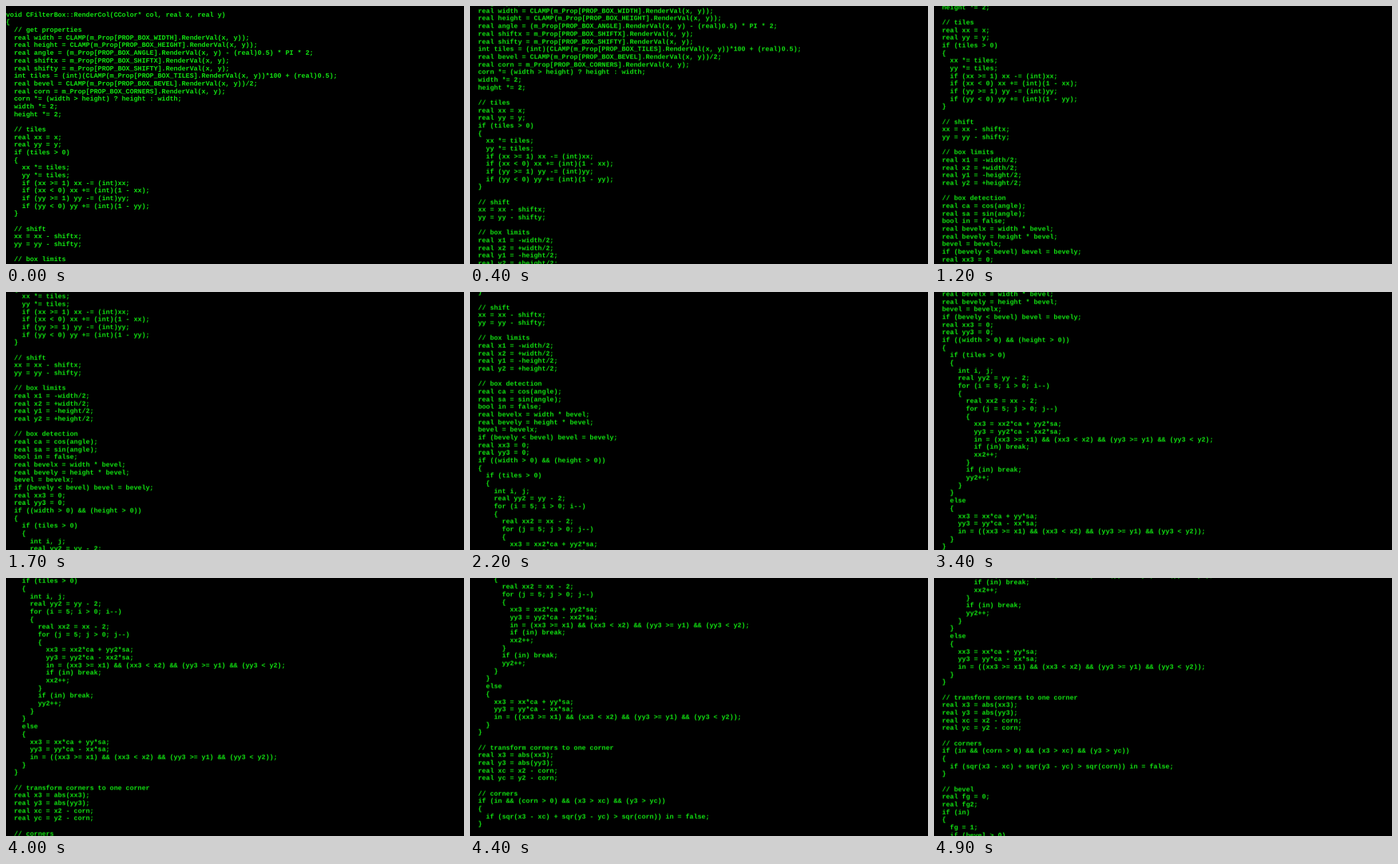
Write an HTML page that moves like this. It is 640 px wide and 360 px high and loops after 5000 ms.

```html
<!DOCTYPE html>
<html lang="en">
<head>
<meta charset="utf-8">
<title>Scrolling code</title>
<style>
  html, body {
    margin: 0;
    width: 100%;
    height: 100%;
    overflow: hidden;
    background: #000;
  }
  .stage {
    position: relative;
    width: 640px;
    height: 360px;
    overflow: hidden;
  }
  pre {
    position: absolute;
    left: 0;
    top: 7.8px;
    margin: 0;
    color: #12e612;
    font: bold 9.3px/10.6667px "Courier New", "Liberation Mono", monospace;
    text-rendering: geometricPrecision;
    animation: scroll 5s infinite;
  }
  /* short ease-in, then 14px every 100ms */
  @keyframes scroll {
    0%   { transform: translateY(0); animation-timing-function: step-end; }
    2%   { transform: translateY(-2.63px); animation-timing-function: step-end; }
    4%   { transform: translateY(-10.5px); animation-timing-function: step-end; }
    6%   { transform: translateY(-23.33px); animation-timing-function: steps(47, end); }
    100% { transform: translateY(-681.33px); }
  }
</style>
</head>
<body>
<div class="stage">
<pre>
void CFilterBox::RenderCol(CColor* col, real x, real y)
{
  // get properties
  real width = CLAMP(m_Prop[PROP_BOX_WIDTH].RenderVal(x, y));
  real height = CLAMP(m_Prop[PROP_BOX_HEIGHT].RenderVal(x, y));
  real angle = (m_Prop[PROP_BOX_ANGLE].RenderVal(x, y) - (real)0.5) * PI * 2;
  real shiftx = m_Prop[PROP_BOX_SHIFTX].RenderVal(x, y);
  real shifty = m_Prop[PROP_BOX_SHIFTY].RenderVal(x, y);
  int tiles = (int)(CLAMP(m_Prop[PROP_BOX_TILES].RenderVal(x, y))*100 + (real)0.5);
  real bevel = CLAMP(m_Prop[PROP_BOX_BEVEL].RenderVal(x, y))/2;
  real corn = m_Prop[PROP_BOX_CORNERS].RenderVal(x, y);
  corn *= (width &gt; height) ? height : width;
  width *= 2;
  height *= 2;

  // tiles
  real xx = x;
  real yy = y;
  if (tiles &gt; 0)
  {
    xx *= tiles;
    yy *= tiles;
    if (xx &gt;= 1) xx -= (int)xx;
    if (xx &lt; 0) xx += (int)(1 - xx);
    if (yy &gt;= 1) yy -= (int)yy;
    if (yy &lt; 0) yy += (int)(1 - yy);
  }

  // shift
  xx = xx - shiftx;
  yy = yy - shifty;

  // box limits
  real x1 = -width/2;
  real x2 = +width/2;
  real y1 = -height/2;
  real y2 = +height/2;

  // box detection
  real ca = cos(angle);
  real sa = sin(angle);
  bool in = false;
  real bevelx = width * bevel;
  real bevely = height * bevel;
  bevel = bevelx;
  if (bevely &lt; bevel) bevel = bevely;
  real xx3 = 0;
  real yy3 = 0;
  if ((width &gt; 0) &amp;&amp; (height &gt; 0))
  {
    if (tiles &gt; 0)
    {
      int i, j;
      real yy2 = yy - 2;
      for (i = 5; i &gt; 0; i--)
      {
        real xx2 = xx - 2;
        for (j = 5; j &gt; 0; j--)
        {
          xx3 = xx2*ca + yy2*sa;
          yy3 = yy2*ca - xx2*sa;
          in = (xx3 &gt;= x1) &amp;&amp; (xx3 &lt; x2) &amp;&amp; (yy3 &gt;= y1) &amp;&amp; (yy3 &lt; y2);
          if (in) break;
          xx2++;
        }
        if (in) break;
        yy2++;
      }
    }
    else
    {
      xx3 = xx*ca + yy*sa;
      yy3 = yy*ca - xx*sa;
      in = ((xx3 &gt;= x1) &amp;&amp; (xx3 &lt; x2) &amp;&amp; (yy3 &gt;= y1) &amp;&amp; (yy3 &lt; y2));
    }
  }

  // transform corners to one corner
  real x3 = abs(xx3);
  real y3 = abs(yy3);
  real xc = x2 - corn;
  real yc = y2 - corn;

  // corners
  if (in &amp;&amp; (corn &gt; 0) &amp;&amp; (x3 &gt; xc) &amp;&amp; (y3 &gt; yc))
  {
    if (sqr(x3 - xc) + sqr(y3 - yc) &gt; sqr(corn)) in = false;
  }

  // bevel
  real fg = 0;
  real fg2;
  if (in)
  {
    fg = 1;
    if (bevel &gt; 0)
</pre>
</div>
</body>
</html>
```
